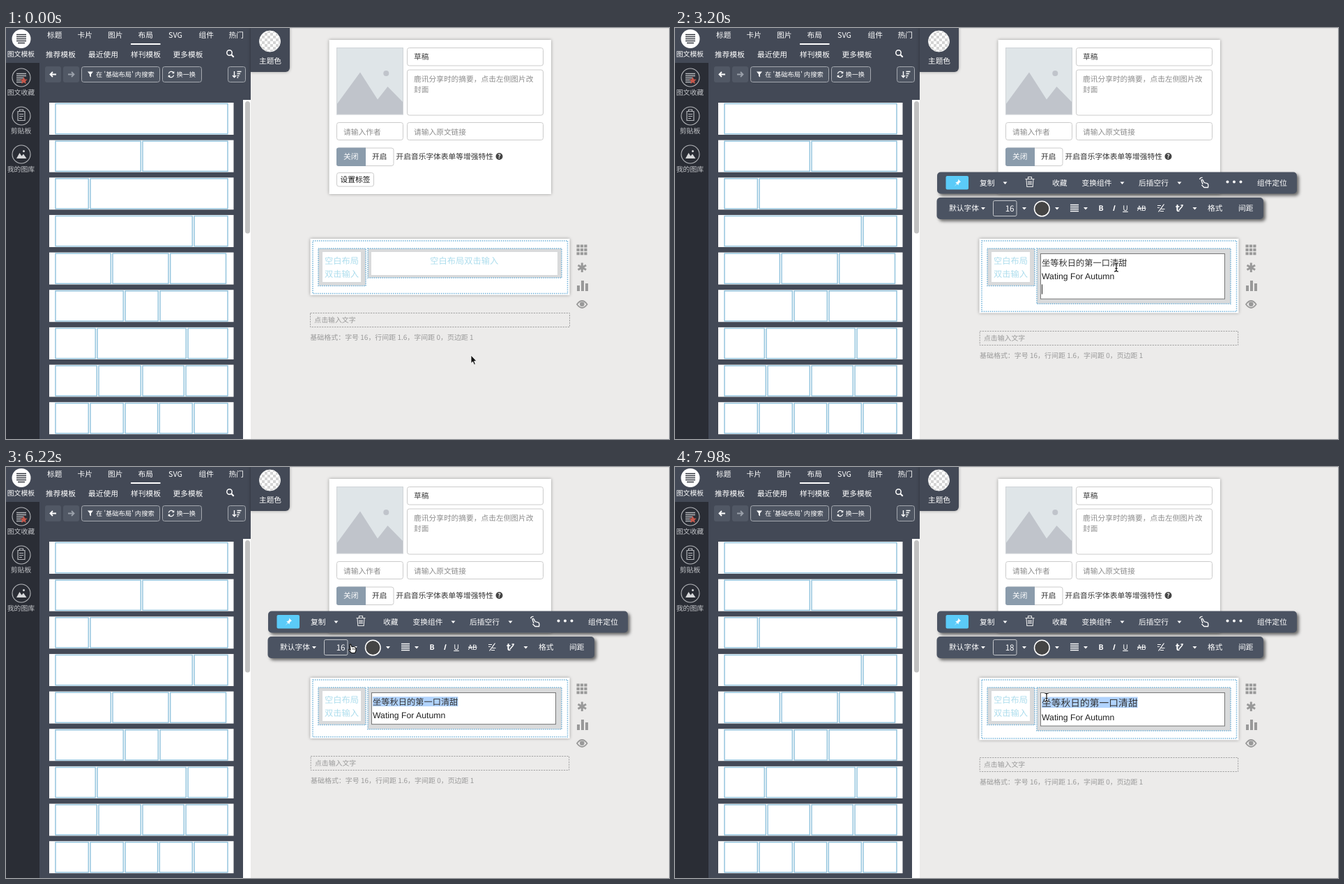
Write an HTML page that moves like this. It is 951 by 589 pixels and loops after 8000 ms.

```html
<!DOCTYPE html>
<html lang="zh-CN">
<head>
<meta charset="utf-8">
<title>Layout editor</title>
<style>
html, body { margin: 0; width: 100%; height: 100%; overflow: hidden; background: #ecebea; }
svg { display: block; width: 100vw; height: 100vh; }
text { font-family: "Noto Sans CJK SC", "Noto Sans CJK", sans-serif; text-rendering: geometricPrecision; white-space: pre; }
.latin { font-family: "Liberation Sans", sans-serif; }
.bar { filter: drop-shadow(3px 3px 2px rgba(0,0,0,.55)); }
.card { filter: drop-shadow(0 0 2px rgba(0,0,0,.35)); }
</style>
</head>
<body>
<svg id="stage" viewBox="0 0 951 589" xmlns="http://www.w3.org/2000/svg"></svg>
<script>
const LOOP = 8000;
const SLATE = '#434956', BAR = '#4b5362', BLUE = '#5bcbf8', PALE = '#addded', EDGE = '#95c5de', DOT = '#74b4da';
const EM = 12.24, LINE = 19.58;

// Markup helpers; text is placed by its vertical centre.
const text = (x, cy, s, size = 10.72, fill = '#fff', more = '') =>
  `<text x="${x}" y="${(cy + size * .37).toFixed(2)}" font-size="${size}" fill="${fill}" ${more}>${s}</text>`;
const mid = (x, cy, s, size, fill, more = '') => text(x, cy, s, size, fill, 'text-anchor="middle" ' + more);
const rect = (x, y, x2, y2, fill, more = '') =>
  `<rect x="${x}" y="${y}" width="${x2 - x}" height="${y2 - y}" fill="${fill}" ${more}/>`;
const box = (x, y, x2, y2, stroke = '#ccc', r = 3, fill = '#fff', w = 1) =>
  rect(x, y, x2, y2, fill, `stroke="${stroke}" stroke-width="${w}" rx="${r}"`);
const circle = (x, y, r, fill, more = '') => `<circle cx="${x}" cy="${y}" r="${r}" fill="${fill}" ${more}/>`;
const line = (d, stroke = '#fff', w = 1.5, more = '') =>
  `<path d="${d}" fill="none" stroke="${stroke}" stroke-width="${w}" ${more}/>`;
const shape = (d, fill = '#fff', more = '') => `<path d="${d}" fill="${fill}" ${more}/>`;
const down = (x, y) => shape(`M${x - 3} ${y - 1.5}h6l-3 3.5z`);
const group = (id, body, more = '') => `<g id="${id}" ${more}>${body}</g>`;
const dotted = `stroke="${DOT}" stroke-width="1.5" stroke-dasharray="1.5 1.5"`;

function sidebar() {
  const ring = y => circle(22, y, 13, 'none', 'stroke="#b4b6ba" stroke-width="1.1"');
  const label = (y, s, fill = '#c3c5c9') => mid(21.5, y, s, 9.9, fill);
  return rect(0, 0, 48, 589, '#2a2d35') + rect(0, 0, 48, 50, SLATE) +
    circle(22, 15.5, 13.5, '#fff') + line('M15 9.5h14M15 12.5h14M15 15.5h14M15 18.5h14M17 21.5h10', '#33373f', 1.6) +
    label(37, '图文模板', '#fff') +
    ring(71) + line('M15 65.5h14M15 68.5h14M15 71.5h10M15 74.5h8M15 77.5h8', '#b4b6ba', 1.3) +
    shape('M25.5 70l1.6 3.4 3.6.4-2.7 2.5.8 3.6-3.3-1.8-3.3 1.8.8-3.6-2.7-2.5 3.6-.4z', '#c4564a') +
    label(92, '图文收藏') +
    ring(126) + line('M17 119.5h10v13h-10zM19.5 119v-2h5v2M19 123.5h6M19 126.5h6M19 129.5h4', '#b4b6ba', 1.2) +
    label(147, '剪贴板') +
    ring(181) + shape('M15 187l4.5-8 3 4.5 2.5-3 4.5 6.5z', '#d6d7d9') + circle(25.5, 176.5, 1.5, '#d6d7d9') +
    label(202, '我的图库');
}

function cards() {
  const rows = [[71], [71, 196], [71, 121], [71, 270], [71, 153, 235.7], [71, 171, 221],
    [71, 131, 261], [71, 133, 196, 258], [71, 121, 171, 220.3, 270]];
  return rows.map((starts, i) => {
    const y = 107 + i * 53.65, end = i === 4 ? 315.5 : 318;
    return rect(62, y, 326.5, y + 46, '#fff') + starts.map((x, k) =>
      box(x, y + 1.5, k + 1 < starts.length ? starts[k + 1] - 2.7 : end, y + 44.7, EDGE, 0, '#fff', 1.5)).join('');
  }).join('');
}

function panel() {
  const tabs = [[59, '标题'], [102.5, '卡片'], [146, '图片'], [189.5, '布局'], [233, 'SVG'], [276.5, '组件'], [319.5, '热门']];
  const sets = [[57, '推荐模板'], [118, '最近使用'], [179, '样刊模板'], [239.5, '更多模板']];
  const checks = [...Array(64).keys()].filter(i => (i + (i >> 3)) % 2)
    .map(i => rect(363 + i % 8 * 4, 3 + (i >> 3) * 4, 367 + i % 8 * 4, 7 + (i >> 3) * 4, '#d4d4d4')).join('');
  return rect(48, 0, 351, 589, SLATE) + rect(340, 103, 351, 589, '#fff') + rect(343, 105, 350, 294.5, '#c1c1c1', 'rx="3.5"') +
    shape('M351 0H407V57a6 6 0 0 1-6 6H351z', SLATE, 'class="card"') +
    circle(378.5, 19, 15, '#fff') + `<clipPath id="disc">${circle(378.5, 19, 15, '#fff')}</clipPath><g clip-path="url(#disc)">${checks}</g>` +
    circle(378.5, 19, 15, 'none', 'stroke="#eee"') + mid(379, 47.5, '主题色') +
    tabs.map(([x, s]) => text(x, 10, s)).join('') + rect(179, 22, 221.5, 24, '#fff') +
    sets.map(([x, s]) => text(x, 38, s)).join('') +
    circle(320.5, 35.5, 3.7, 'none', 'stroke="#fff" stroke-width="1.5"') + line('M323 38l3.7 3.7', '#fff', 2) +
    rect(56, 55, 79, 78, '#515865', 'rx="3"') + line('M72 66.5h-8M67 63l-3.5 3.5 3.5 3.5', '#fff', 1.8) +
    rect(82, 55, 105, 78, '#515865', 'rx="3"') + line('M89 66.5h8M94 63l3.5 3.5-3.5 3.5', '#9aa0aa', 1.8) +
    box(108.5, 55.5, 220.5, 77.5, '#a4a8af', 3, '#4d5461') + shape('M117 62.5h8l-3 3.7v4.3l-2-1.5v-2.8z') +
    text(129, 66.5, "在 '基础布局' 内搜索", 9.3) +
    box(224.5, 55.5, 280.5, 77.5, '#a4a8af', 3, '#4d5461') +
    line('M233.4 65.5a3.8 3.8 0 0 1 7-1.3M240.6 67.5a3.8 3.8 0 0 1-7 1.3', '#fff', 1.3) +
    shape('M241.3 62v3.3h-3.3zM232.7 71v-3.3h3.3z') + text(244.5, 66.5, '换一换', 9.2) +
    box(318.5, 55.5, 343.5, 77.5, '#a4a8af', 3, '#4d5461') +
    line('M327.5 62v8M325 68l2.5 2.8 2.5-2.8M331.5 62.5h6M331.5 65.5h4.5M331.5 68.5h3M331.5 71h1.6', '#fff', 1.4) + cards();
}

function form() {
  const hint = '#8c8c8c';
  return rect(463.5, 17, 782, 238, '#fff', 'class="card"') +
    rect(474, 28, 570, 124, '#dfe5e8') + shape('M474 110L508 63.5 533 102.5 547.5 84 570 107V124H474z', '#c0c4cb') +
    circle(545.3, 65, 4, '#c0c4cb') + rect(474.5, 28.5, 569.5, 124, 'none', 'stroke="#d0d4d8"') +
    box(575.5, 28.5, 770.5, 54) + text(585, 41.5, '草稿', 10.72, '#444') +
    box(575.5, 60, 770.5, 125) + text(585, 73, '鹿讯分享时的摘要，点击左侧图片改', 10.72, hint) + text(585, 88.5, '封面', 10.72, hint) +
    box(474.5, 135.5, 569.5, 160.5) + text(484, 149, '请输入作者', 10.72, hint) +
    box(575.5, 135.5, 770.5, 160.5) + text(585, 149, '请输入原文链接', 10.72, hint) +
    box(474.5, 172, 556, 197.5) + shape('M477 171.5H516V198H477a3 3 0 0 1-3-3V174.500a3 3 0 0 1 3-3z', '#8b9cac') +
    text(484, 184.5, '关闭') + text(525, 184.5, '开启', 10.72, '#333') +
    text(559.5, 184, '开启音乐字体表单等增强特性', 10.72, '#333') +
    circle(707.5, 184, 5, '#454545') + mid(707.5, 184, '?', 8.5, '#fff', 'font-weight="700"') +
    box(474.5, 207.5, 527.5, 227) + text(479.5, 217, '设置标签', 10.72, '#111');
}

function editor() {
  const dark = '#333';
  return rect(436.5, 302, 808.5, 383, '#fff', 'id="block" class="card"') +
    rect(440, 305, 805.5, 381, 'none', `id="frame" ${dotted}`) +
    rect(448, 316, 516, 369.5, '#d9dadb', dotted) + rect(454, 321, 509, 364, '#fff') +
    mid(481.5, 333, '空白布局', EM, PALE) + mid(481.5, 352, '双击输入', EM, PALE) +
    rect(519, 316, 797, 358, '#d9dadb', `id="cell" ${dotted}`) +
    group('blank', rect(524, 321, 791, 354, '#fff') + mid(657.3, 333, '空白布局双击输入', EM, PALE)) +
    group('edit', rect(524.5, 323.5, 788.5, 349, '#fff', 'id="field" stroke="#777"') + rect(526, 329, 526, 343, '#b1d3fd', 'id="select"') +
      group('lines', `<text id="line1" x="526" fill="${dark}">坐等秋日的第一口清甜</text>` +
        `<text id="line2" class="latin" x="526" font-size="${EM}" fill="#222">Wating For Autumn</text>`) +
      rect(0, -7, 1, 7, '#222', 'id="caret"')) +
    group('below', rect(436.5, .5, 808.5, 20.5, 'none', 'id="prompt" stroke="#a2a2a2" stroke-dasharray="2.2 1.4"') +
      text(442.3, 10.3, '点击输入文字', 9.9, '#999') + text(436.3, 35.6, '基础格式：字号 16，行间距 1.6，字间距 0，页边距 1', 9.98, '#999'));
}

function tools() {
  const grey = '#999';
  const dots = [...Array(9).keys()].map(i => rect(818.5 + i % 3 * 5.4, 310.5 + (i / 3 | 0) * 5.4, 822.7 + i % 3 * 5.4, 314.5 + (i / 3 | 0) * 5.4, grey)).join('');
  return dots + line('M826.300 336.500v13.500M820.500 340l11.600 6.500M820.500 346.500l11.600-6.500', grey, 3) +
    shape('M819 369h4v8h-4zM825 362h4v15h-4zM831 366h4v11h-4z', grey) +
    line('M819 396q7.300-10 14.600 0q-7.300 10-14.600 0z', grey, 1.8) + circle(826.3, 395.7, 3.3, grey);
}

function toolbars() {
  return rect(376, 206.5, 892, 237.5, BAR, 'rx="5" class="bar"') + rect(388.5, 212, 421, 231.5, BLUE, 'rx="2"') +
    shape('M406 216.500l4 4-1.200.5-2 2-.2 2.500-2-2-4.100 3.700 3.600-4.200-1.900-1.900 2.500-.3 1.600-2z') +
    text(437, 222, '复制') + down(473.5, 222) +
    line('M502.500 216.500h13M506.500 216v-2.500h5v2.500M504 216.500l.8 11h8.400l.8-11M507 219v6M509 219v6M511 219v6', '#e8e8e8', 1.1) +
    text(541, 222, '收藏') + text(583.5, 222, '变换组件') + down(641.5, 222) + text(665, 222, '后插空行') + down(723.5, 222) +
    line('M757 224l-2-6q1.500-1.500 2.500.5l1.500 3 5 1.500q1.500 1.500.5 5.500h-5.500l-3.500-3.500M752.500 217q1-3 4-2.500', '#fff', 1.3) +
    [792.5, 802, 811.5].map(x => circle(x, 220.5, 2, '#fff')).join('') + text(835, 222, '组件定位') +
    rect(375.5, 243, 844, 274, BAR, 'rx="5" class="bar"') + text(393, 258.5, '默认字体') + down(442, 258.5) +
    box(456.5, 247.5, 490, 269.5, '#c4c7cb', 2, BAR) +
    text(486.5, 258.5, '16', 11.6, '#fff', 'id="size" text-anchor="end"') +
    rect(494, 249.5, 508.5, 267.5, '#398b39', 'id="open"') + down(501, 258.5) +
    circle(526.3, 259, 10.8, '#444', 'stroke="#fff" stroke-width="1.5"') + down(548, 258.5) +
    line('M567 253.500h12M567 256.500h12M567 259.500h12M567 262.500h12', '#fff', 1.6) + down(589, 258.5) +
    mid(611, 258.5, 'B', 10.5, '#fff', 'font-weight="700"') + mid(629, 258.5, 'I', 10.5, '#fff', 'font-style="italic" font-weight="700"') +
    mid(646, 258, 'U', 10.5, '#fff', 'text-decoration="underline"') + mid(669.3, 258.5, 'AB', 10, '#fff', 'text-decoration="line-through"') +
    line('M692 254.500h5M692 257.500h3M697.500 259.500h5M696 262.500h5M701.500 252.500l-8 11', '#fff', 1.2) +
    mid(721, 258, 't', 14, '#fff', 'font-weight="700"') + line('M723 261l5-6M725.500 254h3.500', '#fff', 1.4) + down(745.5, 258.5) +
    text(764, 258.5, '格式') + text(808, 258.5, '间距');
}

function menu() {
  const sizes = [12, 14, 15, 16, 17, 18, 20];
  return rect(454, 278.5, 512.5, 449, '#f7f7f7', 'rx="4" class="bar"') +
    '<clipPath id="list"><rect x="454" y="278.5" width="58.5" height="170.500" rx="4"/></clipPath><g clip-path="url(#list)">' +
    rect(454, 278, 500, 450, BAR) + rect(454, 0, 500, 26, BLUE, 'id="hover"') +
    sizes.map((n, i) => mid(471, 295.3 + i * 26, n, 11.6, '#fff')).join('') + '</g>' +
    rect(503, 281, 509.5, 341, '#bdbdbd', 'rx="3"');
}

function pointers() {
  const beam = 'M-3-6q3 0 3 2V4q0 2-3 2M3-6q-3 0-3 2M3 6q-3 0-3-2M-1.700 1.500H1.700';
  return group('pointer',
    group('arrow', shape('M0 0V11.500L2.600 9.200 4.500 13.500 6.400 12.700 4.600 8.400H8z', '#111', 'stroke="#fff" stroke-width=".8"')) +
    group('beam', line(beam, '#fff', 2.4) + line(beam, '#111', 1.2)) +
    group('hand', shape('M-3.500-5.500q1.300-1 2 .6l1 2.600q5-.8 5.800 2l.2 3.500-1.500 3.300h-5l-4-4.200q-.2-1.600 1.500-.8l1 .6z', '#fff', 'stroke="#111" stroke-width="1.2"') +
      line('M1.200-.5v2.500M3.300 0v2', '#111', .8)));
}

const stage = document.getElementById('stage');
stage.innerHTML = rect(0, 0, 951, 589, '#ecebea') + rect(351, 0, 951, 1, '#dfdedd') + sidebar() + form() + panel() +
  editor() + tools() + group('bars', toolbars()) + group('menu', menu()) + pointers();

const el = {};
stage.querySelectorAll('[id]').forEach(node => el[node.id] = node);
const set = (id, attrs) => { for (const k in attrs) el[id].setAttribute(k, attrs[k]); };
const show = (id, on) => set(id, { display: on ? 'inline' : 'none' });

// Pointer moves: start, end, number of steps, destination.
const moves = [
  [450, 890, 6, 633, 343], [4280, 4800, 7, 655, 337], [4890, 4980, 2, 646, 336],
  [5070, 5510, 6, 530, 333], [5680, 5680, 1, 529, 334], [5950, 6220, 4, 496.5, 260],
  [6480, 6480, 1, 497, 260.5], [6750, 7270, 7, 475.5, 424], [7450, 7450, 1, 475, 425], [7720, 7980, 4, 533, 330]
];

function pointerAt(t) {
  let x = 667, y = 469;
  for (const [from, to, steps, tx, ty] of moves) {
    if (t < from) break;
    const i = steps > 1 ? Math.floor((t - from + 1) / (to - from) * (steps - 1)) : 0;
    const p = Math.min(1, (i + 1) / steps);
    x += (tx - x) * p;
    y += (ty - y) * p;
  }
  return { x, y };
}

const between = (t, a, b) => t >= a && t < b;

function render(t) {
  const editing = t >= 2140, filled = t >= 3120, big = t >= 7720;
  const menuOpen = between(t, 6660, 7720);
  const em = big ? EM * 18 / 16 : EM, first = LINE * em / EM;
  const rows = filled ? (t < 4280 ? 2 : 1) : 0;
  const fieldEnd = 323.5 + 6 + first + rows * LINE;
  const cellEnd = editing ? fieldEnd + 7 : 358;
  const blockEnd = Math.max(370, cellEnd + .5) + 12.8;

  set('block', { height: blockEnd - 302 });
  set('frame', { height: blockEnd - 307.3 });
  set('cell', { height: cellEnd - 316 });
  set('field', { height: fieldEnd - 323.5 });
  set('below', { transform: `translate(${editing ? .7 : 0} ${Math.round(blockEnd + 25)})` });
  set('prompt', { width: editing ? 370.5 : 372 });
  show('blank', !editing);
  show('edit', editing);
  show('lines', filled);
  show('bars', t >= 2050);
  show('menu', menuOpen);
  show('open', menuOpen);

  const y1 = 326.5 + first / 2, y2 = 326.5 + first + LINE / 2;
  set('line1', { y: y1 + em * .37, 'font-size': em });
  set('line2', { y: y2 + EM * .36 });
  el.size.textContent = big ? 18 : 16;

  const { x, y } = pointerAt(t);
  const dragging = between(t, 5070, 5600);
  const chars = dragging ? Math.min(10, Math.round((648.4 - x) / EM)) : between(t, 5600, 6660) || big ? 10 : 0;
  set('select', { x: 526 + (10 - chars) * em, y: y1 - em * .58, width: chars * em, height: em * 1.13 });

  // Caret: empty field, third line, end of second line, end of first line.
  let caret = null;
  if (between(t, 2140, 2680)) caret = [526, y1];
  else if (between(t, 3120, 3650) || between(t, 4190, 4280)) caret = [526, y2 + LINE - 1];
  else if (between(t, 4280, 4780)) caret = [632, y2];
  else if (between(t, 4980, 5070)) caret = [648, y1];
  show('caret', caret);
  if (caret) set('caret', { transform: `translate(${caret})` });

  const row = Math.floor((pointerAt(t - 88).y - 282.4) / 26);
  show('hover', menuOpen && row >= 0);
  set('hover', { y: 282.4 + row * 26 });

  const overField = x > 524 && x < 790 && y > 322 && y < (editing ? fieldEnd : 354);
  const kind = menuOpen || (editing && y < 275) || between(t, 7720, 7800) ? 'hand' : overField ? 'beam' : 'arrow';
  for (const k of ['arrow', 'beam', 'hand']) show(k, k === kind);
  set('pointer', { transform: `translate(${x} ${y})` });
}

const start = performance.now();
function tick() {
  render((performance.now() - start) % LOOP);
  requestAnimationFrame(tick);
}
render(0);
requestAnimationFrame(tick);
</script>
</body>
</html>
```
